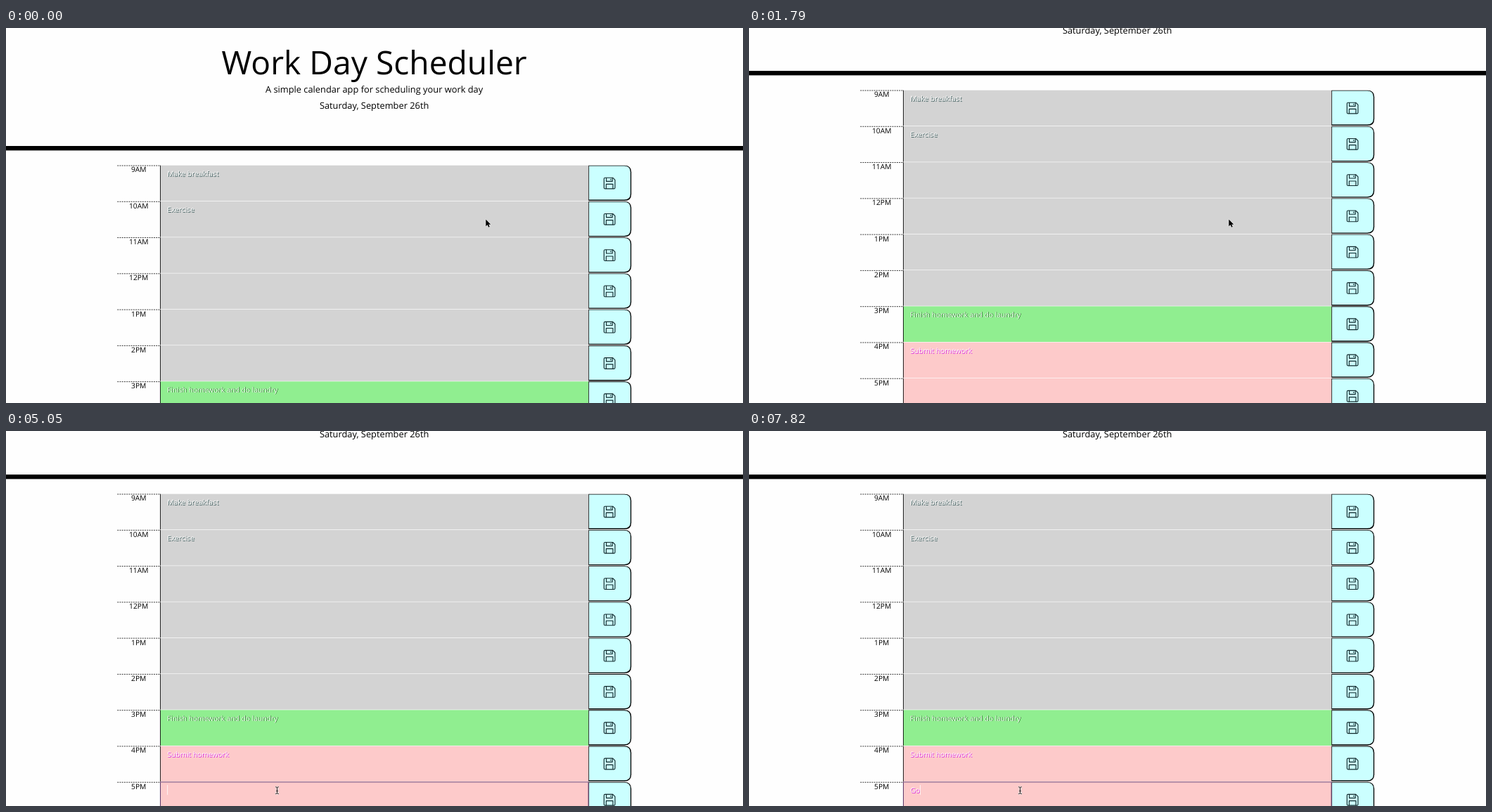
Recreate the animation shown at these times as an HTML page. Size 1048 by 534 pixels, loop 8000 ms.

```html
<!DOCTYPE html>
<html lang="en">
<head>
<meta charset="utf-8">
<title>Work Day Scheduler</title>
<style>
  html, body { margin: 0; width: 100%; height: 100%; overflow: hidden; background: #fefefe; }
  svg { display: block; }
  text { font-family: "Open Sans", "Noto Sans", sans-serif; font-size: 10.26px; text-rendering: geometricPrecision; white-space: pre; }
  .center { text-anchor: middle; }
  .title { font-size: 46.2px; }
  .lead { font-size: 12.83px; }
</style>
</head>
<body>
<svg id="stage" width="1048" height="534" viewBox="0 0 1048 534">
  <defs>
    <g id="disk" fill="none" stroke="#12282c" stroke-width="1.15" stroke-linejoin="round">
      <path d="M-6.4-7.8H4.6L7.8-4.6V6.4Q7.8 7.9 6.3 7.9H-6.3Q-7.8 7.9-7.8 6.4V-6.3Q-7.8-7.8-6.4-7.8Z"/>
      <path d="M-4.6-7.8V-2.6H4V-7.8M1.7-6.3V-4.2M-4.8 7.9V1.4H4.8V7.9"/>
    </g>
    <g id="save">
      <path d="M828.3.64H879.5Q889.2.64 889.2 10.3V41.4Q889.2 51 879.5 51H828.3Z"/>
      <path d="M829.1 1.5H879.2Q887.9 1.5 887.9 10.3V41Q887.9 49.6 879.2 49.6H829.1Z" fill="#cbffff"/>
      <use href="#disk" x="858.2" y="26"/>
    </g>
  </defs>
  <g id="page">
    <text class="center title" x="523.6" y="66">Work Day Scheduler</text>
    <text class="center lead" x="523.6" y="91.5">A simple calendar app for scheduling your work day</text>
    <text class="center lead" x="523.6" y="114.7">Saturday, September 26th</text>
    <rect y="168" width="1048" height="6.4"/>
    <g id="rows"></g>
    <rect id="focus" x="219.5" width="608.6" height="50.4" fill="none" stroke-width=".9"/>
    <rect id="caret" width=".8" height="14" fill="#fff"/>
  </g>
  <path id="arrow" d="M0 0V10L2.3 7.9 3.8 11.3 5.5 10.6 4 7.3H7Z" stroke="#fff" stroke-width="1" paint-order="stroke"/>
  <g id="beam" fill="none">
    <path id="beamShape" d="M-2.3-5Q0-5 0-3.6Q0-5 2.3-5M0-3.6V3.6M-2.3 5Q0 5 0 3.6Q0 5 2.3 5" stroke="#fff" stroke-opacity=".7" stroke-width="2.2"/>
    <use href="#beamShape" style="display:none"/>
    <path d="M-2.3-5Q0-5 0-3.6Q0-5 2.3-5M0-3.6V3.6M-2.3 5Q0 5 0 3.6Q0 5 2.3 5M-1.2.8H1.2" stroke="#111" stroke-width=".95"/>
  </g>
</svg>
<script>
const LOOP = 8000, TOP = 195, PITCH = 51.28, TEXT_X = 229.2;
const $ = id => document.getElementById(id);

const kinds = {
  past: { fill: '#d3d3d3', shadow: '#2f4f4f' },
  present: { fill: '#90ee90', shadow: '#0a640a' },
  future: { fill: '#fdcaca', shadow: '#d818d8' }
};
const hours = [
  ['9AM', 'past', 'Make breakfast'], ['10AM', 'past', 'Exercise'], ['11AM', 'past', ''],
  ['12PM', 'past', ''], ['1PM', 'past', ''], ['2PM', 'past', ''],
  ['3PM', 'present', 'Finish homework and do laundry'],
  ['4PM', 'future', 'Submit homework'], ['5PM', 'future', '']
];

$('rows').innerHTML = hours.map(([label, kind, note], i) => {
  const { fill, shadow } = kinds[kind];
  return `<g transform="translate(0 ${TOP + i * PITCH})">
    <path d="M158.3 1H219.2" stroke="#000" stroke-width=".8" stroke-dasharray="1.95 1.28"/>
    <text class="center" x="188.7" y="10.4">${label}</text>
    <rect x="219.2" y=".64" width="609.2" height="50.64" fill="${fill}"/>
    <rect x="219.1" y=".64" width=".85" height="50.64"/>
    <text class="note" x="${TEXT_X + .75}" y="16.65" fill="${shadow}">${note}</text>
    <text class="note" x="${TEXT_X}" y="15.9" fill="#fff">${note}</text>
    <use href="#save"/>
  </g>`;
}).join('');
const typed = [...document.querySelectorAll('.note')].slice(-2);

// Each step changes only the listed values; the rest carry over.
const steps = [
  { at: 0, scroll: 0, pointer: 'arrow', x: 682.3, y: 272.4, row: -1, caret: 0, text: '' },
  { at: 480, scroll: 31 },
  { at: 1290, scroll: 98 },
  { at: 1790, scroll: 107 },
  { at: 2270, scroll: 106 },
  { at: 2780, x: 424.5, y: 471.6 },
  { at: 3290, x: 384.5, y: 509.4 },
  { at: 3920, row: 1, caret: 268.8 },
  { at: 4290, caret: 0, pointer: 'beam', x: 418.5, y: 515 },
  { at: 4690, x: 385.5, y: 511.8 },
  { at: 5050, row: 8, caret: 229.3 },
  { at: 5610, caret: 0 },
  { at: 6270, caret: 229.3 },
  { at: 6870, caret: 0 },
  { at: 7140, text: 'G', caret: 237 },
  { at: 7620, caret: 0 },
  { at: 7820, text: 'Go', caret: 243.1 }
];

const show = (el, on) => el.setAttribute('visibility', on ? 'visible' : 'hidden');

function draw(time) {
  const s = Object.assign({}, ...steps.filter(step => step.at <= time));
  $('page').setAttribute('transform', `translate(0 ${-s.scroll})`);
  for (const id of ['arrow', 'beam']) {
    show($(id), s.pointer === id);
    $(id).setAttribute('transform', `translate(${s.x} ${s.y})`);
  }
  const rowTop = TOP + s.row * PITCH;
  show($('focus'), s.row >= 0);
  $('focus').setAttribute('y', rowTop + .7);
  $('focus').setAttribute('stroke', s.row === 8 ? '#603a70' : '#8a2a90');
  show($('caret'), s.caret > 0);
  $('caret').setAttribute('x', s.caret);
  $('caret').setAttribute('y', rowTop + 4.9);
  for (const el of typed) if (el.textContent !== s.text) el.textContent = s.text;
}

const start = performance.now();
function tick() {
  draw((performance.now() - start) % LOOP);
  requestAnimationFrame(tick);
}
tick();
</script>
</body>
</html>
```
